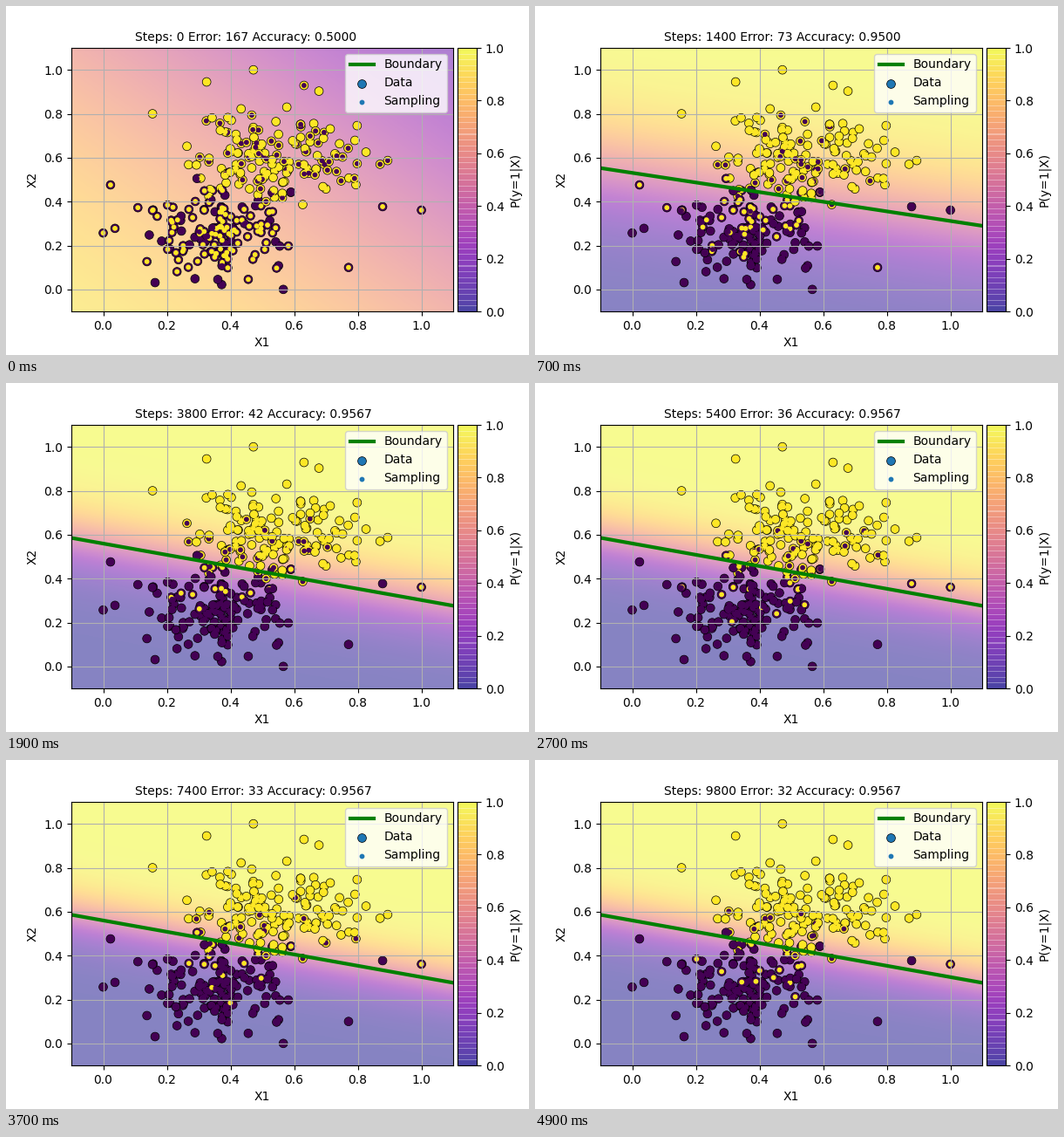
Write a matplotlib script that moves like this. It is 600 px wide and 400 px high and loops after 5 s.

```python
import numpy as np
import matplotlib.pyplot as plt
from matplotlib.animation import FuncAnimation

FRAMES, INTERVAL, STEPS_PER_FRAME = 50, 100, 200
LOW, HIGH = -0.1, 1.1
CLASS_SIZE = 150
START_WEIGHTS = np.array([-1.75, -1.75, 2.25])

# A few outliers frame each class; the rest is a random cloud.
LOWER_OUTLIERS = [(0, 0.257), (0.023, 0.476), (0.037, 0.278), (0.163, 0.031),
                  (0.566, 0), (0.771, 0.1), (0.878, 0.377), (1, 0.361)]
UPPER_OUTLIERS = [(0.155, 0.8), (0.325, 0.945), (0.472, 1), (0.631, 0.929),
                  (0.678, 0.903), (0.798, 0.746), (0.87, 0.57), (0.894, 0.587)]

rng = np.random.default_rng(7)


def make_class(outliers, center, spread):
    z = rng.normal(size=(1000, 2))
    cloud = z[np.hypot(*z.T) < 2.3][:CLASS_SIZE - len(outliers)]
    return np.vstack([outliers, center + cloud * spread])


def decay(step, scale, power=1.0):
    return np.exp(-(step / scale) ** power)


def model(step):
    """Weights of x, y and the bias after a number of training steps."""
    steepness = 18 * (1 - decay(step, 2900, 0.8))
    slope = 0.258 - 0.416 * decay(step, 590)
    intercept = 0.560 - 0.313 * decay(step, 590)
    trained = steepness * np.array([slope, 1, -intercept])
    return trained + START_WEIGHTS * decay(step, 120)


def sample_labels(logits, errors, noise):
    """Flip the labels most likely to be sampled wrongly."""
    score = logits * (1 - 2 * labels) + noise.logistic(size=len(labels))
    sampled = labels.copy()
    wrong = np.argsort(-score)[:errors]
    sampled[wrong] = 1 - sampled[wrong]
    return sampled


points = np.vstack([
    make_class(LOWER_OUTLIERS, (0.375, 0.275), (0.125, 0.115)),
    make_class(UPPER_OUTLIERS, (0.53, 0.61), (0.14, 0.11))])
labels = np.repeat([0, 1], CLASS_SIZE)
order = rng.permutation(len(points))
points, labels = points[order], labels[order]
label_colors = plt.get_cmap("viridis")([0.0, 1.0])
grid_x, grid_y = np.meshgrid(*[np.linspace(LOW, HIGH, 240)] * 2)

fig = plt.figure(figsize=(6, 4), dpi=100)
ax = fig.add_axes([75 / 600, 50 / 400, 438.1 / 600, 302 / 400])
cax = fig.add_axes([518.1 / 600, 50 / 400, 21.9 / 600, 302 / 400])

image = ax.imshow(np.zeros_like(grid_x), cmap="plasma", vmin=0, vmax=1,
                  alpha=0.5, origin="lower", aspect="auto",
                  extent=(LOW, HIGH, LOW, HIGH))
fig.colorbar(image, cax=cax, label="P(y=1|X)")

# A second translucent layer with thin gaps gives the colorbar its stripes.
bands = np.arange(46) / 46
cax.barh(bands, 1, height=0.84 / 46, align="edge", alpha=0.5,
         color=plt.get_cmap("plasma")(bands + 0.5 / 46))
cax.set(xlim=(0, 1), ylim=(0, 1))

boundary, = ax.plot([], [], color="green", lw=3, label="Boundary")
data = ax.scatter([], [], s=50, color="C0", edgecolors="black",
                  linewidths=0.5, label="Data")
sampling = ax.scatter([], [], s=10, color="C0", label="Sampling")
ax.legend(loc="upper right")
title = ax.text(0.1, 1.13, "")

data.set_offsets(points)
data.set_facecolor(label_colors[labels])
sampling.set_offsets(points)

ax.set(xlim=(LOW, HIGH), ylim=(LOW, HIGH), xlabel="X1", ylabel="X2",
       xticks=np.arange(6) / 5, yticks=np.arange(6) / 5)
ax.grid(True)


def update(frame):
    step = frame * STEPS_PER_FRAME
    w1, w2, bias = model(step)

    image.set_data(1 / (1 + np.exp(-(w1 * grid_x + w2 * grid_y + bias))))
    ends = np.array([LOW, HIGH] if step else [])
    boundary.set_data(ends, -(bias + w1 * ends) / w2)

    errors = round(31 + 136 * decay(step, 1130, 0.75))
    correct = round(287 - 137 * decay(step, 36, 0.386))
    sampled = sample_labels(points @ [w1, w2] + bias, errors,
                            np.random.default_rng(frame))
    sampling.set_color(label_colors[sampled])
    title.set_text(f"Steps: {step} Error: {errors} "
                   f"Accuracy: {correct / len(labels):.4f}")
    return image, boundary, sampling, title


animation = FuncAnimation(fig, update, frames=FRAMES, interval=INTERVAL,
                          repeat=True, repeat_delay=0, blit=False)
plt.show()
```
